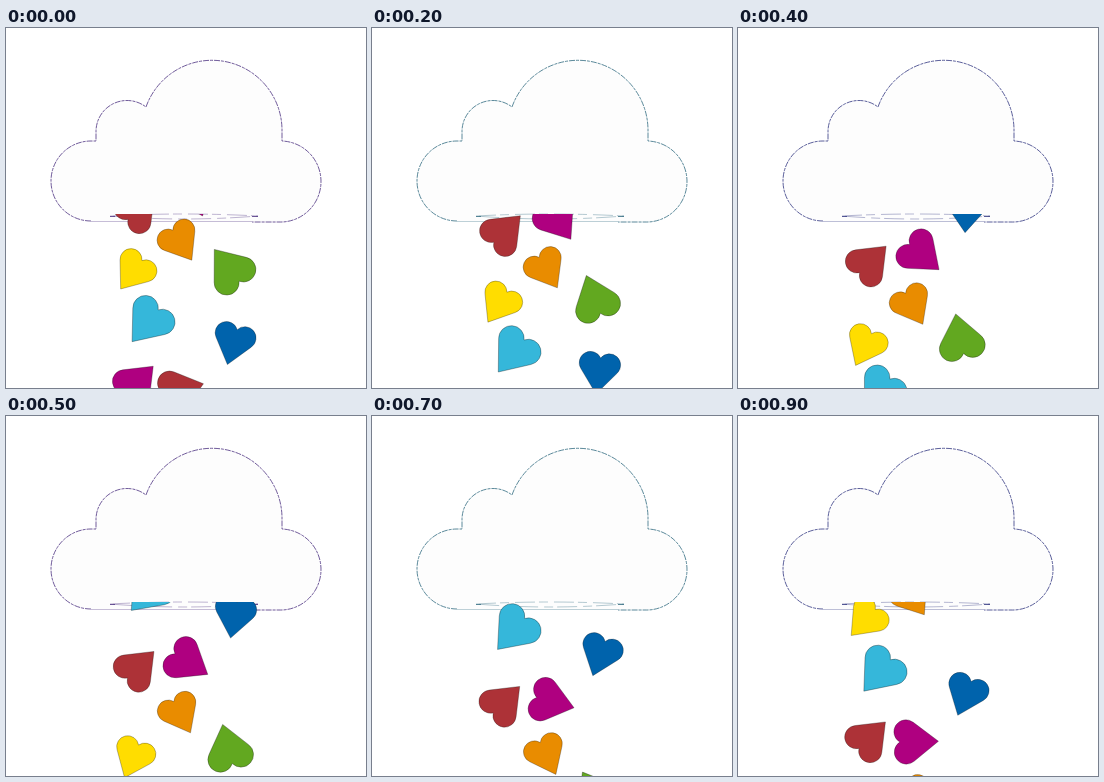
An HTML page that plays this animation: 360 px wide and 360 px high, repeating every 1 s.

```html
<!DOCTYPE html>
<html lang="en">
<head>
<meta charset="utf-8">
<title>Cloud raining hearts</title>
<style>
  html, body { margin: 0; width: 100%; height: 100%; overflow: hidden; background: #fff; }
  svg { display: block; width: 100vw; height: 100vh; }
  #cloud { fill: none; stroke-width: .8; }
  #hearts path { stroke: rgba(20, 20, 20, .5); stroke-width: .6; stroke-linejoin: round; }
</style>
</head>
<body>
<svg viewBox="0 0 360 360">
  <clipPath id="rain"><rect y="186" width="360" height="174"/></clipPath>
  <g id="cloud">
    <path fill="#fdfdfd" stroke-dasharray="6 1 3 1" d="M85 193A40 40 0 0 1 85 113H90V103A31 31 0 0 1 140 79A70 70 0 0 1 276 101V113A40.500 40.500 0 0 1 273 194H246"/>
    <path opacity=".4" d="M85 193.500H246"/>
    <path opacity=".45" stroke-dasharray="20 4 9 6" d="M104 188Q178 184 252 188Q178 194 104 188"/>
    <path d="M104 188.500h5M246 188.500h6"/>
  </g>
  <g id="hearts" clip-path="url(#rain)"></g>
</svg>
<script>
const STEP = 100, COUNT = 10, FALL = 1.05;
// Upright heart, 46 units high, centred on the origin.
const SHAPE = 'M0 23L20.3-2.8A12.5 12.5 0 1 0 0-17.3A12.5 12.5 0 1 0-20.3-2.8Z';
const RED = '#ad3237', MAGENTA = '#af0080';

// Each heart falls from its first to its last step while it turns;
// steps past COUNT run on into the next loop.
const hearts = [
  { color: RED, late: MAGENTA, size: .93, from: 0, to: 11.5, x: [133.5, 132], y: [168, 366], turn: [-135, -135] },
  { color: MAGENTA, late: RED, size: .96, from: 0, to: 11, x: [189, 176], y: [154, 366], turn: [-16, -108] },
  { color: '#e98c00', size: .88, from: 9, to: 19, x: [175, 175], y: [182, 382], turn: [-34, -24] },
  { color: '#ffdd00', size: .88, from: 8, to: 16, x: [127, 126.5], y: [184, 367], turn: [46, 20] },
  { color: '#62a820', size: 1, from: 0, to: 7, x: [222.5, 222], y: [224, 376], turn: [130, 150], swing: 28 },
  { color: '#35b7da', size: 1.02, from: 5, to: 14, x: [141, 141], y: [177, 365], turn: [42, 38] },
  { color: '#0063ac', size: .9, from: 4, to: 13, x: [228.5, 226.5], y: [184, 362], turn: [4, 2], swing: 19 },
];

const layer = document.getElementById('hearts');
const cloud = document.getElementById('cloud');
const mix = ([a, b], p) => a + (b - a) * p;

function addPath() {
  const el = document.createElementNS('http://www.w3.org/2000/svg', 'path');
  el.setAttribute('d', SHAPE);
  return layer.appendChild(el);
}
for (const h of hearts) h.paths = [addPath(), addPath()];

function place(el, h, step, lap) {
  // The rain leaps ahead at the seam of the loop, then settles.
  const time = step + lap * COUNT + Math.max(0, .8 - .3 * step);
  const p = (time - h.from) / (h.to - h.from);
  const shown = p >= 0 && p <= 1;
  el.style.display = shown ? '' : 'none';
  if (!shown) return;
  const x = mix(h.x, p), y = mix(h.y, p ** FALL);
  const angle = mix(h.turn, p) + (h.swing || 0) * Math.sin(Math.PI * p);
  el.setAttribute('fill', lap && h.late || h.color);
  el.setAttribute('transform', `translate(${x} ${y}) rotate(${angle}) scale(${h.size})`);
}

function draw(step) {
  const hue = 225 + 35 * Math.cos(2 * Math.PI * step / 5);
  cloud.style.stroke = `hsl(${hue} 45% 35%)`;
  for (const h of hearts) h.paths.forEach((el, lap) => place(el, h, step, lap));
}

function tick() {
  draw(Math.floor(performance.now() / STEP) % COUNT);
  requestAnimationFrame(tick);
}
tick();
</script>
</body>
</html>
```
